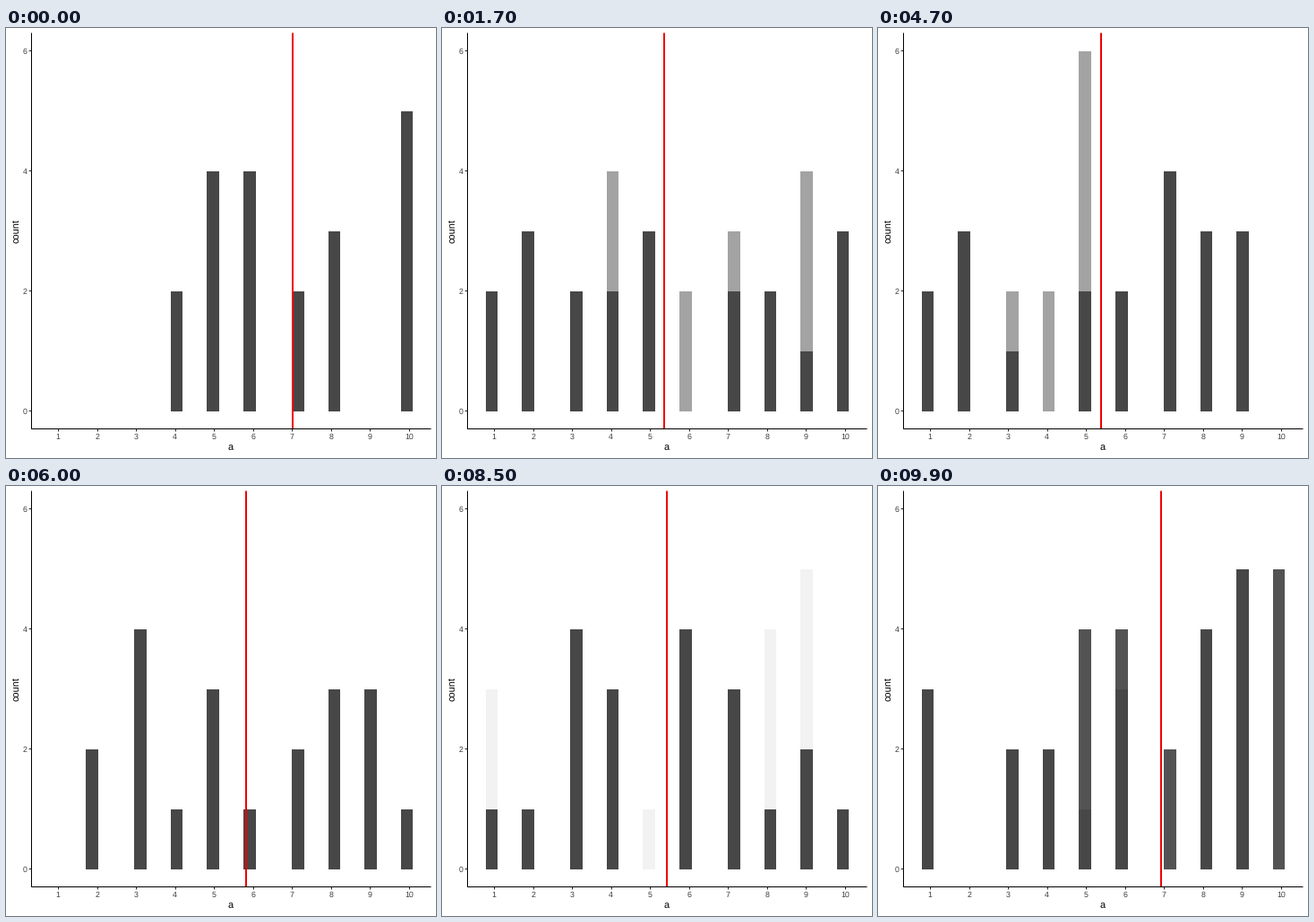
A matplotlib script that plays this animation: 480x480 px, repeating every 10000 ms.

```python
import math

import matplotlib.pyplot as plt
from matplotlib.animation import FuncAnimation
from matplotlib.patches import Rectangle

SIZE, DPI = 480, 72          # at 72 dpi one point is one pixel
LEFT, RIGHT, TOP, BOTTOM = 28.45, 474.5, 5.5, 447.7
BIN = 9 / 29                 # thirty bins across 1..10
X_MIN, X_SPAN = BIN, 33 * BIN
Y_MIN, Y_SPAN = -0.3, 6.6
FRAMES, STEP = 100, 10
DRAWS, VALUES = 20, range(1, 11)

BAR, RED = "#474747", "#ee0000"
LABEL, TICK = "#3b3b3b", "#242424"

plt.rcParams["font.family"] = "Liberation Sans"
plt.rcParams["text.hinting"] = "none"


def deal(mean, height, peaks, shoulders=(), gaps=()):
    """Counts per value: peaks at full height, shoulders one lower, gaps empty.

    The other draws are spread evenly, then moved until the mean is right.
    """
    counts = dict.fromkeys(VALUES, 0)
    counts.update(dict.fromkeys(peaks, height))
    counts.update(dict.fromkeys(shoulders, height - 1))
    fixed = {*peaks, *shoulders, *gaps}
    free = [v for v in VALUES if v not in fixed]
    base, extra = divmod(DRAWS - sum(counts.values()), len(free))
    for i, v in enumerate(free):
        counts[v] = base + (i >= len(free) - extra)

    while need := round(mean * DRAWS) - sum(v * n for v, n in counts.items()):
        moves = [(a, b) for a in free for b in free
                 if counts[a] and abs(need - (b - a)) < abs(need)]

        # prefer a move of the right length, from a full to an empty column
        def cost(move):
            a, b = move
            return abs(need - (b - a)) - 2 * (counts[a] - counts[b]), -a

        a, b = min(moves, key=cost)
        counts[a] -= 1
        counts[b] += 1
    return mean, list(counts.values())


SAMPLES = [
    deal(7.00, 5, peaks=[10], shoulders=[5, 6], gaps=[1, 2, 3, 9]),
    deal(5.30, 3, peaks=[2, 5, 10], gaps=[6]),
    deal(5.40, 4, peaks=[4, 9], shoulders=[7], gaps=[10]),
    deal(5.30, 4, peaks=[2], shoulders=[6, 7], gaps=[5]),
    deal(5.60, 4, peaks=[7], shoulders=[2, 8, 9], gaps=[4, 10]),
    deal(5.15, 6, peaks=[5], gaps=[10]),
    deal(5.80, 4, peaks=[3], shoulders=[5, 8, 9], gaps=[1]),
    deal(5.85, 4, peaks=[9], shoulders=[3, 5]),
    deal(5.40, 4, peaks=[3, 6], shoulders=[4, 7], gaps=[5]),
    deal(5.85, 5, peaks=[9], shoulders=[8], gaps=[2, 7, 10]),
]


def px(value):
    return LEFT + (value - X_MIN) / X_SPAN * (RIGHT - LEFT)


def py(count):
    return BOTTOM - (count - Y_MIN) / Y_SPAN * (BOTTOM - TOP)


fig = plt.figure(figsize=(SIZE / DPI, SIZE / DPI), dpi=DPI, facecolor="white")
ax = fig.add_axes([0, 0, 1, 1])
ax.set_xlim(0, SIZE)
ax.set_ylim(SIZE, 0)
ax.axis("off")


def make_bars(zorder):
    bars = []
    for value in VALUES:
        k = round(value / BIN)
        x0, x1 = round(px((k - 0.5) * BIN)), round(px((k + 0.5) * BIN))
        bar = Rectangle((x0, round(py(0))), x1 - x0, 0, facecolor=BAR,
                        linewidth=0, antialiased=False, zorder=zorder)
        bars.append(ax.add_patch(bar))
    return bars


def set_bars(bars, counts, alpha):
    for bar, n in zip(bars, counts):
        bar.set_height(round(py(n)) - round(py(0)))
        bar.set_alpha(alpha)
        bar.set_visible(n > 0 and alpha > 0)


def line(xs, ys, color, width, zorder=5):
    return ax.plot(xs, ys, color=color, linewidth=width, snap=False,
                   solid_capstyle="butt", zorder=zorder)[0]


def vline(x, y0, y1, color):
    x = math.floor(x) + 0.5
    line([x, x], [y0, y1], color, 1)


def hline(y, x0, x1, color):
    y = math.floor(y) + 0.5
    line([x0, x1], [y, y], color, 1)


def label(x, y, text, size=11, color="black", ha="center", **kw):
    ax.text(x, y, text, size=size, color=color, ha=ha, va="baseline", **kw)


def draw_axes():
    vline(LEFT, TOP, BOTTOM, "black")
    hline(BOTTOM, LEFT, RIGHT, "black")
    for value in VALUES:
        x = px(value)
        vline(x, BOTTOM, BOTTOM + 2.75, TICK)
        label(x - 0.5, 459, str(value), 8.8, LABEL)
    for count in (0, 2, 4, 6):
        y = py(count)
        hline(y, LEFT - 2.75, LEFT, TICK)
        label(23.4, y + 3.15, str(count), 8.8, LABEL, "right")
    label((LEFT + RIGHT) / 2 - 0.5, 472.2, "a")
    label(14, (TOP + BOTTOM) / 2, "count", rotation=90,
          rotation_mode="anchor")


entering, leaving = make_bars(1), make_bars(2)
mean_line = line([0, 0], [TOP, BOTTOM], RED, 2, zorder=4)
draw_axes()


def progress(index, k):
    """Eased share of the way to the next sample; the first hold is shorter."""
    last_held = 3 if index == 0 else 4
    share = max(0, k - last_held) / (STEP - last_held)
    return (1 - math.cos(math.pi * share)) / 2


def update(frame):
    index, k = divmod(frame, STEP)
    mean, counts = SAMPLES[index]
    next_mean, next_counts = SAMPLES[(index + 1) % len(SAMPLES)]
    t = progress(index, k)
    set_bars(leaving, counts, 1)
    set_bars(entering, next_counts, t)
    x = round(px(mean + (next_mean - mean) * t))
    mean_line.set_xdata([x, x])
    return [*entering, *leaving, mean_line]


anim = FuncAnimation(fig, update, frames=FRAMES, interval=100,
                     repeat=True, repeat_delay=0, blit=False)
plt.show()
```
